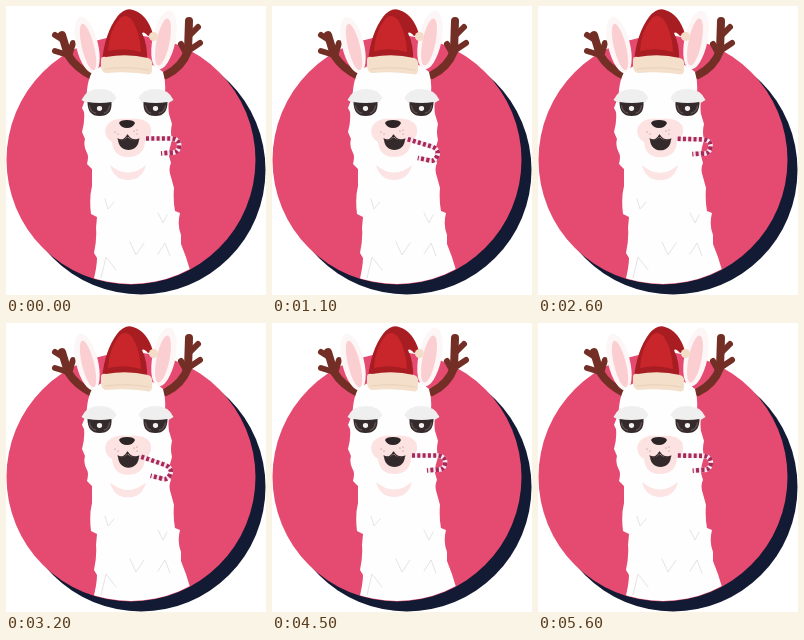
An HTML page with a canvas for the animation above (5700 ms loop, 260 by 289 pixels).

```html
<!DOCTYPE html>
<html lang="en">
<head>
<meta charset="utf-8">
<title>Festive llama</title>
<style>
html, body { margin: 0; width: 100%; height: 100%; overflow: hidden; background: #fff; }
canvas { display: block; width: 260px; height: 289px; }
</style>
</head>
<body>
<canvas id="stage"></canvas>
<script>
const LOOP = 5700, STEP = 100;
// two chews and a short rest make one period
const FIRST_CHEW = 370, CHEW = 1020, PERIOD = 2170;
const WHITE = '#fefefe', PINK = '#e54a70', NAVY = '#131a34', BLUSH = '#fde2e2', DARK = '#352a2b';

// [ms into a chew, value]; the jaw shuts before the cane swings back up
const JAW = [[0, 0], [380, 1], [740, 0]];
const CANE = [[0, 0], [340, 19], [680, 19], [920, 0]];

const canvas = document.getElementById('stage');
const ctx = canvas.getContext('2d');
const ratio = window.devicePixelRatio || 1;
canvas.width = 260 * ratio;
canvas.height = 289 * ratio;

function track(keys, t) {
  for (let i = 1; i < keys.length; i++) {
    const [t0, a] = keys[i - 1], [t1, b] = keys[i];
    if (t <= t1) return a + (b - a) * (1 - Math.cos(Math.PI * (t - t0) / (t1 - t0))) / 2;
  }
  return 0;
}

function fill(d, color) {
  ctx.fillStyle = color;
  ctx.fill(new Path2D(d));
}

function line(d, color, width, cap = 'round') {
  ctx.strokeStyle = color;
  ctx.lineWidth = width;
  ctx.lineCap = cap;
  ctx.lineJoin = 'round';
  ctx.stroke(new Path2D(d));
}

function oval(x, y, rx, ry, color, turn = 0) {
  ctx.fillStyle = color;
  ctx.beginPath();
  ctx.ellipse(x, y, rx, ry, turn, 0, 2 * Math.PI);
  ctx.fill();
}

function antlers() {
  const brown = '#732f25';
  line('M86 70 Q70 62 62 49 L56 29', brown, 8);
  line('M62 49 L49 45 M57 34 L49 29 M63 50 L67 37', brown, 6);
  line('M160 69 Q176 61 182 45 L183 15', brown, 8);
  line('M182 45 L194 37 M183 30 L192 21 M180 47 L175 38', brown, 6);
}

function ears() {
  oval(81, 39, 11, 29, '#fdf6f6', -.24);
  oval(82, 41, 6, 24, '#fbcfd1', -.24);
  oval(158, 34, 11.5, 30, '#fdf6f6', .2);
  oval(157, 36, 6.5, 24, '#fbcfd1', .2);
}

function body() {
  ctx.save();
  ctx.beginPath();
  ctx.rect(0, 0, 260, 154);
  ctx.arc(125, 154, 124, 0, Math.PI);
  ctx.clip();
  fill('M86 66 Q100 55 122 55 Q146 55 157 66 Q160 76 159 86 L163 94 Q162 102 163 108 L166 118' +
    'Q164 126 166 134 Q163 142 163 150 L165 157 Q162 163 165 171 L168 182 Q167 194 169 205' +
    'L174 207 Q171 219 175 229 L175 238 Q180 250 184 264 L184 280 L86 280 Q91 262 91 252' +
    'L88 247 Q91 233 90 222 L91 211 L85 208 Q83 192 86 180 L86 163 L81 158 Q83 150 81 147' +
    'Q77 140 79 133 L76 126 Q79 115 78 106 L76 102 Q81 90 81 84 Q82 74 86 66Z', WHITE);
  ctx.restore();
  const fur = '#e6e3e5';
  line('M124 236 L130 249 L138 237 M152 207 L157 217 L161 209 M99 193 L102 203 L108 196', fur, 1);
  line('M95 272 L100 251 L110 264 M152 248 L159 237 L164 250', fur, 1);
}

function hat() {
  fill('M96 55 Q99 27 111 11 Q119 1 127 4 Q141 8 147 28 L142 30 Q138 25 136 27 Q142 39 141 56Z', '#a71d22');
  fill('M102 45 Q103 25 114 12 Q120 7 126 14 Q134 26 135 46 Q118 41 102 45Z', '#c9262b');
  oval(147.5, 30.5, 4.5, 4.5, '#f4ddc8');
  fill('M95 54 Q95 50 100 51 Q121 47 142 52 Q147 53 146 60 L146 65 Q145 70 140 68' +
    'Q119 65 101 67 Q96 67 95 61Z', '#f3dfca');
  line('M99 63 Q121 60 143 64', '#ead0ba', 1);
}

function eye(x, side) {
  ctx.save();
  ctx.translate(x, 96);
  ctx.scale(side, 1);
  fill('M-18 -2 Q-13 -13 0 -13 Q13 -13 17 -4 L13 1 Q0 2 -13 1Z', '#efeff0');
  fill('M-12 0 Q0 2 12 0 Q13 14 0 14 Q-12 14 -12 0Z', DARK);
  line('M-10 4 Q-9 10 -4 11 M10 4 Q9 10 5 11', '#5d4f50', 1.5);
  ctx.restore();
  oval(x, 102.5, 2.6, 2.4, '#f2f0f2');
}

function muzzle(jaw) {
  const chin = jaw * 5, lip = 144 + jaw * 6;
  ctx.save();
  ctx.translate(0, chin);
  fill('M104 159 Q122 174 140 159 Q136 174 122 174 Q108 174 104 159Z', '#fde4e4');
  ctx.restore();
  fill(`M106 135 L139 135 Q138 ${lip + 7} 122 ${lip + 7} Q107 ${lip + 7} 106 135Z`, BLUSH);
  fill('M122 113 Q137 111 144 119 Q147 127 142 133 Q133 141 122 137 Q110 141 102 133' +
    'Q97 126 101 119 Q108 111 122 113Z', BLUSH);
  // cubic sides bring the lowest point of the mouth to the lip height
  const low = 133 + (lip - 133) / .75;
  fill(`M112 133 Q118 136 121.5 131 Q126 136 133 133 C133 ${low} 112 ${low} 112 133Z`, DARK);
  line('M112 133 Q118 136 121.5 129 Q126 136 133 133', DARK, 1.2);
  fill('M113 117 Q114 114 121 114 Q128 114 129 117 Q127 122 121 122 Q115 122 113 117Z', '#2c2425');
  for (const [x, y] of [[109, 126], [112, 128], [128, 125], [131, 124], [131, 128]]) {
    oval(x, y, .6, .6, '#a77c80');
  }
}

function candy(angle, jaw) {
  const shape = 'M0 0 L26 0 Q34 1 33 8 Q32 15 25 14 L15 15';
  ctx.save();
  ctx.translate(140 - angle * .25, 132.5 + jaw * 4 + angle * .04);
  ctx.rotate(angle * Math.PI / 180);
  line(shape, '#f6e6ec', 4.6, 'butt');
  ctx.setLineDash([3, 2.3]);
  line(shape, '#a9285a', 4.6, 'butt');
  ctx.restore();
}

function draw(t) {
  const phase = t < FIRST_CHEW ? PERIOD : (t - FIRST_CHEW) % PERIOD;
  const chew = phase < 2 * CHEW ? phase % CHEW : CHEW;
  const jaw = track(JAW, chew), angle = track(CANE, chew);
  ctx.setTransform(ratio, 0, 0, ratio, 0, 0);
  ctx.fillStyle = '#fff';
  ctx.fillRect(0, 0, 260, 289);
  oval(135, 164, 124.5, 124.5, NAVY);
  oval(125, 154, 124.5, 124.5, PINK);
  antlers();
  ears();
  body();
  hat();
  eye(93.5, 1);
  eye(149.5, -1);
  muzzle(jaw);
  candy(angle, jaw);
}

function tick() {
  const t = performance.now() % LOOP;
  draw(Math.floor(t / STEP) * STEP);
  requestAnimationFrame(tick);
}
tick();
</script>
</body>
</html>
```
